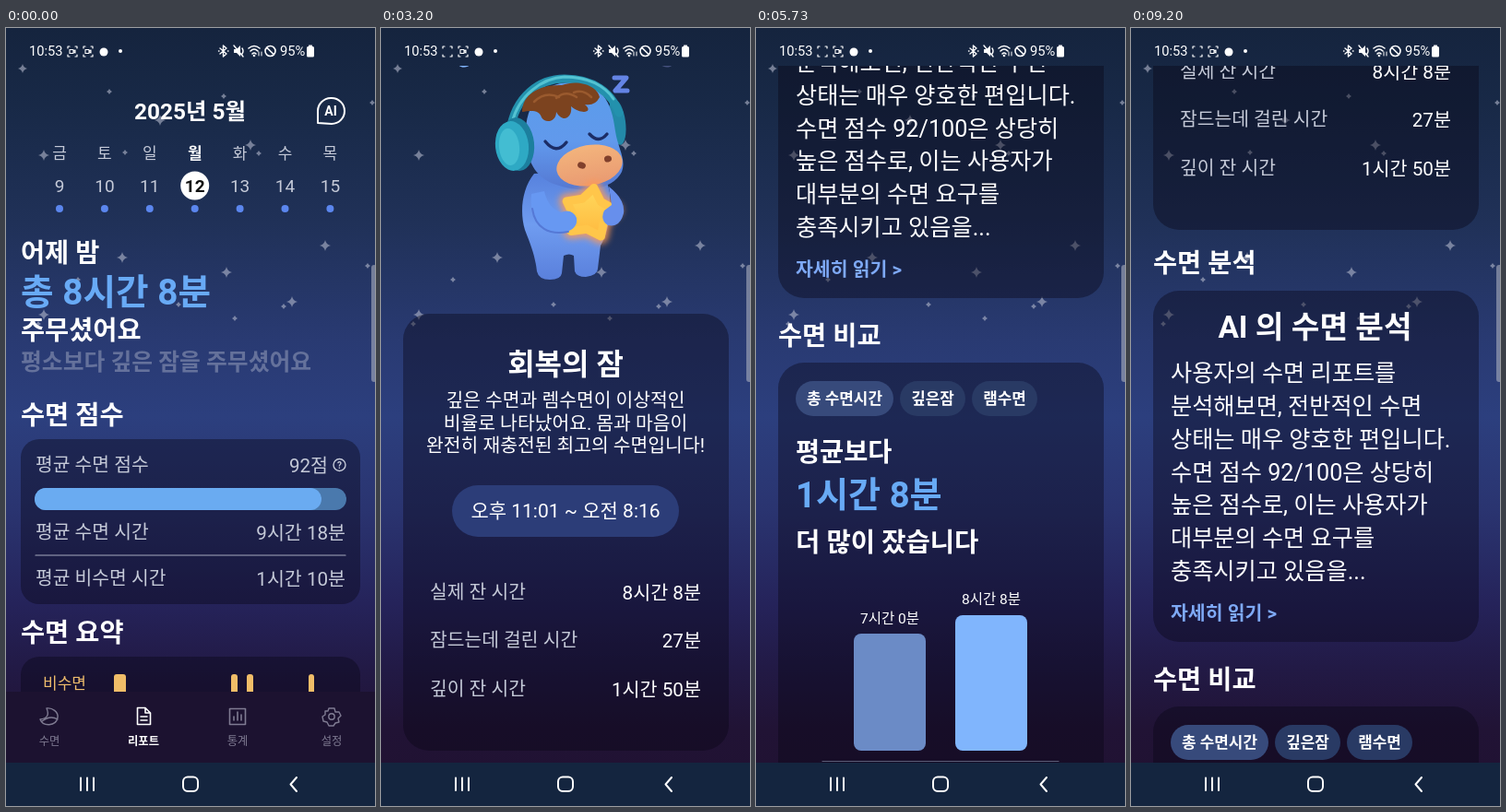
Animation, 400 px wide and 844 px high, one loop 9.4 s. Source, as an HTML page:

```html
<!DOCTYPE html>
<html lang="ko">
<head>
<meta charset="utf-8">
<title>수면 리포트</title>
<style>
  html, body { margin: 0; width: 100%; height: 100%; overflow: hidden; background: #15243f; }
  svg { display: block; width: 100vw; height: 100vh; }
  text { font-family: Roboto, "Noto Sans CJK KR", "Noto Sans CJK", sans-serif; white-space: pre; }
  .line { fill: none; stroke-linecap: round; stroke-linejoin: round; }
</style>
</head>
<body>
<svg id="stage" viewBox="0 0 400 844" xmlns="http://www.w3.org/2000/svg"></svg>
<script>
const LOOP = 9400;
const WHITE = '#fff', SOFT = '#c5cad8', BLUE = '#68aaf5', CARD = 'rgba(8,6,22,.4)';

// Text is placed by the vertical centre of its glyphs.
const text = (x, cy, size, str, { fill = WHITE, weight = 400, anchor = 'start' } = {}) =>
  `<text x="${x}" y="${(cy + size * 0.365).toFixed(2)}" font-size="${size}" font-weight="${weight}" fill="${fill}" text-anchor="${anchor}">${str}</text>`;
const bold = (x, cy, size, str, fill = WHITE) => text(x, cy, size, str, { fill, weight: 700 });
const mid = (x, cy, size, str, fill = WHITE, weight = 400) => text(x, cy, size, str, { fill, weight, anchor: 'middle' });
const end = (x, cy, size, str, fill = WHITE) => text(x, cy, size, str, { fill, anchor: 'end' });
const rect = (x, y, w, h, r, fill) => `<rect x="${x}" y="${y}" width="${w}" height="${h}" rx="${r}" fill="${fill}"/>`;
const circle = (x, y, r, fill) => `<circle cx="${x}" cy="${y}" r="${r}" fill="${fill}"/>`;
const oval = (x, y, rx, ry, fill, turn = 0) =>
  `<ellipse cx="${x}" cy="${y}" rx="${rx}" ry="${ry}" fill="${fill}" transform="rotate(${turn} ${x} ${y})"/>`;
const line = (d, stroke = WHITE, width = 2) => `<path class="line" d="${d}" stroke="${stroke}" stroke-width="${width}"/>`;
const shape = (d, fill) => `<path d="${d}" fill="${fill}"/>`;
const gradient = (id, stops) => `<linearGradient id="${id}" x2="0" y2="1">` +
  stops.map(([at, c]) => `<stop offset="${at}" stop-color="${c}"/>`).join('') + '</linearGradient>';

const defs = `<defs>
  ${gradient('sky', [[0, '#15243e'], [0.1, '#182947'], [0.25, '#203158'], [0.4, '#293a72'], [0.5, '#2c3f7e'],
    [0.62, '#2a3470'], [0.74, '#25235a'], [0.82, '#221a46'], [0.9, '#211335'], [1, '#201131']])}
  ${gradient('skin', [[0, '#5a9cea'], [0.55, '#6199ec'], [1, '#5578d2']])}
  ${gradient('body', [[0, '#5580dc'], [0.5, '#6f9cf0'], [1, '#5a80dc']])}
  ${gradient('muzzle', [[0, '#f3b47c'], [1, '#e99a72']])}
  ${gradient('gold', [[0, '#ffd95c'], [1, '#ffb93f']])}
  <filter id="blur" x="-30%" y="-30%" width="160%" height="160%"><feGaussianBlur stdDeviation="3.5"/></filter>
  <clipPath id="view"><rect y="41" width="400" height="756"/></clipPath>
</defs>`;

function sky() {
  const stars = [[18, 44, 5], [112, 69, 3], [236, 74, 3], [167, 100, 6], [265, 127, 6], [274, 136, 3], [129, 135, 3],
    [41, 138, 6], [346, 236, 6], [126, 249, 6], [78, 273, 3], [239, 265, 6], [392, 258, 3], [310, 297, 6],
    [301, 302, 3], [187, 300, 3], [248, 315, 3], [41, 311, 6], [35, 321, 3], [397, 81, 3]];
  return rect(0, 0, 400, 844, 0, 'url(#sky)') + '<g opacity=".6">' + stars.map(([x, y, r]) =>
    shape(`M${x} ${y - r}Q${x + 1} ${y - 1} ${x + r} ${y}Q${x + 1} ${y + 1} ${x} ${y + r}Q${x - 1} ${y + 1} ${x - r} ${y}Q${x - 1} ${y - 1} ${x} ${y - r}Z`, '#b4b9cc')).join('') + '</g>';
}

function home() {
  const days = [...'금토일월화수목'].map((day, i) => {
    const x = 58 + i * 48.9, today = i === 3;
    return mid(x, 136, 17, day, today ? WHITE : SOFT, today ? 700 : 400) +
      (today ? circle(x, 171, 15.5, WHITE) : '') +
      mid(x, 171, 19, 9 + i, today ? '#111' : SOFT, today ? 700 : 400) + circle(x, 196, 4, '#5b86ee');
  }).join('');
  const row = (y, label, value, right = 368) => text(32, y, 20.4, label, { fill: SOFT }) + end(right, y, 20.6, value, SOFT);
  const idle = '#7f7b92';
  return mid(199.5, 90, 24.4, '2025년 5월', WHITE, 700) +
    line('M338 103V90A14.5 14 0 0 1 352 76H353A14 14 0 0 1 353 104Z') + mid(352, 90, 14, 'AI', WHITE, 700) + days +
    bold(16, 243.5, 28.4, '어제 밤') + bold(16, 286, 38.7, '총 8시간 8분', BLUE) + bold(16, 328, 28.4, '주무셨어요') +
    bold(16, 362, 24.8, '평소보다 깊은 잠을 주무셨어요', 'rgba(255,255,255,.28)') +
    bold(16, 420, 28.4, '수면 점수') + rect(16, 446, 368, 179, 20, CARD) +
    row(474, '평균 수면 점수', '92점', 349) + `<circle class="line" cx="361.5" cy="474" r="6.5" stroke="${SOFT}" stroke-width="1.4"/>` +
    mid(361.5, 474, 10, '?', SOFT, 700) +
    rect(31, 499, 338, 24, 12, '#4a79ad') + rect(31, 499, 311, 24, 12, '#6aabf1') +
    row(547, '평균 수면 시간', '9시간 18분') + line('M32 572H368', '#a5a9bd', 1.2) + row(597, '평균 비수면 시간', '1시간 10분') +
    bold(16, 656, 28.4, '수면 요약') + shape('M16 720V702A20 20 0 0 1 36 682H364A20 20 0 0 1 384 702V720Z', CARD) +
    text(40, 711, 17, '비수면', { fill: '#efbd6c' }) +
    [[117, 13], [244, 7], [261, 7], [328, 6]].map(([x, w]) => rect(x, 701, w, 24, 3, '#f0bd68')).join('') +
    rect(0, 720, 400, 77, 0, '#1c1230') +
    line('M44 738C47 745 45 749 37 750C40 758 54 758 56 748C57 742 50 737 44 738ZM39 752Q48 745 56 750', idle, 1.4) +
    line('M142.5 737.5H151L156.5 743V755.5H142.5ZM151 737.5V743H156.5M146 747H153M146 751H153', WHITE, 1.6) +
    line('M242.5 738.5H259.5V755.5H242.5ZM247 751V747M251 751V742M255 751V745', idle, 1.6) +
    line('M350 738H356L357 742L361 742L363 746L360 749L361 753L357 754L355 757H350L348 753L344 752L343 747L346 745L346 741L349 741Z', idle, 1.4) +
    `<circle class="line" cx="353" cy="747" r="3.2" stroke="${idle}" stroke-width="1.4"/>` +
    ['수면', '리포트', '통계', '설정'].map((label, i) =>
      mid(47 + i * 102, 774, 12.3, label, i === 1 ? WHITE : idle, i === 1 ? 700 : 400)).join('');
}

function mascot() {
  const starPoints = Array.from({ length: 10 }, (_, i) => {
    const a = i * Math.PI / 5 - 1.4, r = i % 2 ? 17.5 : 28;
    return `${(226 + r * Math.cos(a)).toFixed(1)},${(517 + r * Math.sin(a)).toFixed(1)}`;
  }).join(' ');
  const star = (fill, edge, width, extra = '') =>
    `<polygon points="${starPoints}" fill="${fill}" stroke="${edge}" stroke-width="${width}" stroke-linejoin="round" ${extra}/>`;
  return oval(256, 418, 9, 25, '#2389a8', -8) +
    shape('M166 474C153 490 150 515 156 535C163 553 167 563 169 580Q171 589 183 589Q195 589 196 582L198 563Q204 560 209 563L210 580Q212 586 222 586Q235 584 235 577L238 552Q250 532 248 495Q246 478 230 470Z', 'url(#body)') +
    shape('M157 440C154 402 172 376 204 375C238 374 250 394 254 428C257 447 266 458 261 472C251 492 218 496 190 486C170 480 159 463 157 440Z', 'url(#skin)') +
    oval(226, 465, 36, 22, 'url(#muzzle)', -10) +
    oval(217.5, 465, 4.5, 3.5, '#80402c', 20) + oval(246, 458, 4, 3.5, '#80402c', -10) +
    line('M178 439Q190 454 201 440M226 431Q236 442 245 431', '#1c2d66', 3.4) +
    line('M140 428C145 390 172 371 199 371C230 371 250 386 258 408', '#2391ad', 9) +
    line('M142 419C149 389 175 370 199 369C225 369 243 379 252 393', '#54c3d2', 3) +
    shape('M153 407C153 388 172 377 196 378C214 371 235 379 237 391Q232 401 221 399C231 407 218 411 206 401C208 413 197 420 190 407C190 418 178 420 174 413C172 405 163 405 153 407Z', '#7c431f') +
    line('M166 396Q178 384 193 391M190 392Q200 383 212 391M209 386Q219 382 228 391', '#9a5a2e', 2.5) +
    oval(148, 442, 18, 29, '#1c7f9e', -6) + oval(142, 444, 18, 27, '#2ea9c4', -6) + oval(139, 445, 11, 20, '#43bdd2', -6) +
    star('#ff9a4d', '#ff9a55', 16, 'filter="url(#blur)" opacity=".85"') + star('url(#gold)', '#ffc64a', 9) +
    shape('M163 496C160 522 174 541 198 538Q214 534 212 522Q207 511 195 516Q181 511 177 493Z', '#6798f2') +
    line('M164 512C167 533 182 541 203 537', '#5579d6', 2) +
    shape('M247 488Q265 502 263 517Q259 533 246 530Q237 524 242 514L250 508Z', '#678fec') +
    line('M253 370H266L254 384H267', '#6484e5', 5);
}

function report() {
  const panel = (top, bottom) => rect(24, top, 353, bottom - top, 28, CARD);
  const row = (y, label, value) => text(53, y, 20.4, label, { fill: SOFT }) + end(347, y, 20.7, value);
  const chip = (x, w, label, fill) => rect(x, 1637, w, 38, 19, fill) + mid(x + w / 2, 1656, 16.9, label, WHITE, 700);
  const arc = 'M90 348.5A254 254 0 0 1 310 348.5';
  const analysis = ['사용자의 수면 리포트를', '분석해보면, 전반적인 수면', '상태는 매우 양호한 편입니다.', '수면 점수 92/100은 상당히',
    '높은 점수로, 이는 사용자가', '대부분의 수면 요구를', '충족시키고 있음을...'];
  return line('M66 100H47M56 91L47 100L56 109', WHITE, 2.2) + mid(200, 100, 28.6, 'AI 수면 리포트', WHITE, 700) +
    mid(200, 221.5, 34, '5.12 (월)', WHITE, 700) + mid(199, 265.5, 38.7, '92점 / 100점', WHITE, 700) +
    line(arc, '#46527f', 20) +
    `<path id="gauge" class="line" d="${arc}" pathLength="100" stroke="#80b5fc" stroke-width="20"/>` + mascot() +
    panel(626, 1100) + mid(200, 680, 32, '회복의 잠', WHITE, 700) +
    ['깊은 수면과 렘수면이 이상적인', '비율로 나타났어요. 몸과 마음이', '완전히 재충전된 최고의 수면입니다!']
      .map((s, i) => mid(200, 719.5 + i * 24.7, 20.4, s)).join('') +
    rect(77, 812, 246, 56, 28, '#2c3d78') + mid(200, 839.5, 21, '오후 11:01 ~ 오전 8:16') +
    row(928, '실제 잔 시간', '8시간 8분') + row(980, '잠드는데 걸린 시간', '27분') + row(1033, '깊이 잔 시간', '1시간 50분') +
    bold(24, 1136, 28.4, '수면 분석') + panel(1166, 1547) + mid(199.5, 1205, 33.3, 'AI 의 수면 분석', WHITE, 700) +
    analysis.map((s, i) => text(43, 1255 + i * 35.8, 25.2, s)).join('') +
    bold(43, 1515.5, 20.5, '자세히 읽기 &gt;', '#7ea9f6') +
    bold(24, 1587.5, 28.4, '수면 비교') + panel(1617, 2100) +
    chip(43, 106, '총 수면시간', '#374a7b') + chip(156, 71, '깊은잠', '#293a64') + chip(234, 71, '램수면', '#293a64') +
    bold(43, 1713.5, 28.4, '평균보다') + bold(43, 1760, 38.2, '1시간 8분', BLUE) + bold(43, 1812, 28.6, '더 많이 잤습니다') +
    rect(106, 1911, 78, 127, 8, '#6b8bc6') + rect(216, 1891, 78, 147, 8, '#80b5fd') +
    mid(145, 1894, 15.5, '7시간 0분') + mid(255, 1873, 15.5, '8시간 8분') + line('M72 2049.5H328', '#5a5d78', 1.2) +
    mid(154, 2067, 12.5, '평균', SOFT) + mid(246, 2067, 12.5, '오늘', SOFT);
}

function systemBars() {
  const frame = x => line(`M${x - 5} 22V20H${x - 3}M${x + 3} 20H${x + 5}V22M${x + 5} 29V31H${x + 3}M${x - 3} 31H${x - 5}V29`, WHITE, 1.2);
  const camera = x => line(`M${x - 3} 23.5H${x + 1}V27.5H${x - 3}ZM${x + 1} 25L${x + 3} 24V27Z`, WHITE, 1.1);
  return text(25, 25, 14.7, '10:53') + frame(72) + `<g id="blink">${camera(72)}</g>` + frame(89) + camera(89) +
    circle(106, 26, 4.5, WHITE) + circle(124, 25, 2, WHITE) +
    line('M232 22L239 28L235.5 31V19L239 22L232 28M230.5 25H231M240.5 25H241', WHITE, 1.4) +
    shape('M247 23H250L254 19V31L250 27H247Z', WHITE) + line('M247 19L257 31M256 22Q258 25 256 28', WHITE, 1.4) +
    line('M263 22Q269 17 275 22M265 25Q269 21 273 25M267 28Q269 26 271 28', WHITE, 1.6) + circle(269, 30, 1.3, WHITE) +
    line('M274 30V26M277 26V30', WHITE, 1) +
    line('M281 25A5.5 5.5 0 1 1 292 25A5.5 5.5 0 1 1 281 25M282.5 21L290.5 29', WHITE, 1.6) +
    text(297, 25, 14.7, '95%') + rect(328, 18.5, 4, 2, 0.5, WHITE) + rect(326, 20, 8, 11.5, 1.5, WHITE) +
    rect(396, 257, 6, 127, 3, 'rgba(170,175,190,.6)') + rect(0, 797, 400, 47, 0, '#14253f') +
    line('M81 813.5V827M88 813.5V827M95 813.5V827') +
    `<rect class="line" x="192" y="812.5" width="16" height="15.5" rx="5" stroke="#fff" stroke-width="2"/>` +
    line('M315 813L308.5 820.5L315 828');
}

document.getElementById('stage').innerHTML = defs + sky() + `<g id="home">${home()}</g>` +
  `<g id="report" clip-path="url(#view)"><g id="scroller">${report()}</g></g>` + systemBars();
const el = Object.fromEntries(['home', 'report', 'scroller', 'gauge', 'blink'].map(id => [id, document.getElementById(id)]));

const progress = (t, from, to) => Math.min(1, Math.max(0, (t - from) / (to - from)));
const easeOut = p => 1 - (1 - p) ** 3;

// Scroll keys: time, offset, speed in px per ms.
const scrollKeys = [[2333, 0, 0], [3200, 316, 0.3], [4200, 593, 0.32], [5133, 998, 0.4],
  [6300, 1381, 0], [6667, 1381, 0], [7933, 881, 0]];

function scrollAt(t) {
  if (t <= scrollKeys[0][0]) return 0;
  const i = scrollKeys.findIndex(key => t < key[0]);
  if (i < 0) return scrollKeys.at(-1)[1];
  const [t0, y0, v0] = scrollKeys[i - 1], [t1, y1, v1] = scrollKeys[i];
  const span = t1 - t0, p = (t - t0) / span, q = 1 - p;
  return q * q * (1 + 2 * p) * y0 + p * p * (3 - 2 * p) * y1 + span * p * q * (q * v0 - p * v1);
}

function draw(t) {
  const shown = easeOut(progress(t, 1070, 1450));
  el.home.setAttribute('opacity', 1 - shown);
  el.report.setAttribute('opacity', shown);
  el.gauge.setAttribute('stroke-dasharray', `${94 * easeOut(progress(t, 1130, 1870))} 200`);
  el.scroller.setAttribute('transform', `translate(0 ${-Math.round(scrollAt(t))})`);
  el.blink.setAttribute('opacity', t < 600 || (t >= 6000 && t < 8130) ? 1 : 0);
}

// The screen refreshes 15 times a second.
const start = performance.now(), STEP = 1000 / 15;
function tick() {
  const t = (performance.now() - start) % LOOP;
  draw(Math.floor((t + 5) / STEP) * STEP);
  requestAnimationFrame(tick);
}
tick();
</script>
</body>
</html>
```
